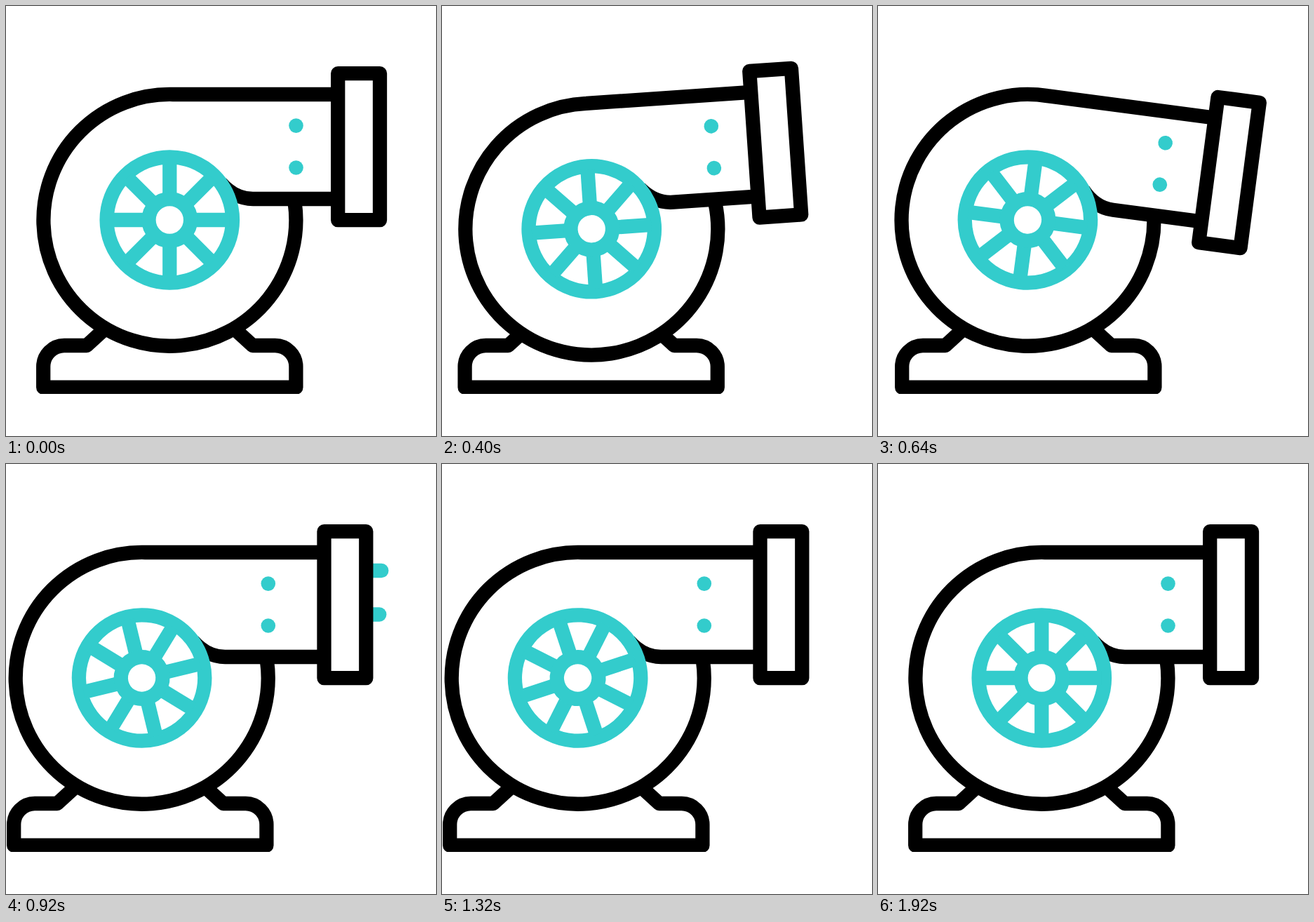
Write an HTML page that moves like this. It is 613 px wide and 613 px high and loops after 2 s.

```html
<!DOCTYPE html>
<html lang="en">
<head>
<meta charset="utf-8">
<title>Turbocharger</title>
<style>
  html, body { margin: 0; width: 100%; height: 100%; overflow: hidden; background: #fff; }
  svg { display: block; width: 100vw; height: 100vh; }
  .ink, .teal { fill: none; stroke-width: 20.3; stroke-linejoin: round; }
  .ink { stroke: #000; }
  .teal { stroke: #3cc; }
  .solid { fill: #fff; }
  .dot { fill: #3cc; }
  #air { stroke-linecap: round; }
</style>
</head>
<body>
<svg viewBox="0 0 613 613">
  <g id="air" class="teal">
    <path d="M390 152H500"/>
    <path d="M380 214.5H497"/>
  </g>
  <path id="base" class="ink" d="M150 452L115 484H83A30 30 0 0 0 53.2 514V543.7H413.4V514A30 30 0 0 0 383.6 484H351.6L316.6 452"/>
  <g id="body">
    <path class="solid" d="M233 126H484V275H233Z"/>
    <path class="ink solid" d="M484 126H238A180 179.4 0 1 0 411.6 280"/>
    <path class="ink" d="M484 275H352C334 275 318 266 306 252"/>
    <path id="flange" class="ink solid" d="M473.2 96.1H533V305.2H473.2Z"/>
    <circle class="dot" cx="413.5" cy="170.6" r="10.3"/>
    <circle class="dot" cx="413.5" cy="230.5" r="10.3"/>
    <g id="wheel" class="teal">
      <circle class="solid" cx="233.3" cy="305" r="89.7"/>
      <g id="spokes"></g>
      <circle class="solid" cx="233.3" cy="305" r="29.8"/>
    </g>
  </g>
  <path class="solid" d="M0 553H613V613H0Z"/>
</svg>
<script>
  const LOOP = 2000, STEP = 40, HUB = '233.3 305';
  const part = id => document.getElementById(id);
  const [air, base, body, flange, wheel, spokes] =
    ['air', 'base', 'body', 'flange', 'wheel', 'spokes'].map(part);

  spokes.innerHTML = [0, 45, 90, 135].map(a =>
    `<path d="M148 305H318.6" transform="rotate(${a} ${HUB})"/>`).join('');

  // Each track is a list of [time in ms, value], eased between neighbours.
  const tracks = {
    baseX: [[80, 0], [320, -34], [520, 4], [760, -42], [1640, -42], [1920, 0]],
    bodyX: [[80, 0], [320, -31], [520, 0], [760, -39.7], [1640, -39.7], [1920, 0]],
    bodyY: [[80, 0], [320, 19.7], [520, 0]],
    tilt: [[80, 0], [320, -14.2], [520, 15], [760, 0]],
    slide: [[560, 0], [780, 20], [1640, 20], [1920, 0]],
    spin: [[760, 0], [1640, 360]],
    airX: [[760, 0], [1640, 405]]
  };

  const ease = u => u * u * (3 - 2 * u);

  function at(name, t) {
    const keys = tracks[name];
    const next = keys.findIndex(k => k[0] > t);
    if (next === 0) return keys[0][1];
    if (next < 0) return keys[keys.length - 1][1];
    const [t0, a] = keys[next - 1], [t1, b] = keys[next];
    return a + (b - a) * ease((t - t0) / (t1 - t0));
  }

  function draw(t) {
    const v = name => at(name, t);
    const move = (el, x) => el.setAttribute('transform', `translate(${x} 0)`);
    move(base, v('baseX'));
    move(flange, v('slide'));
    move(air, v('airX'));
    air.setAttribute('visibility', t > 760 && t < 1320 ? 'visible' : 'hidden');
    body.setAttribute('transform',
      `translate(${v('bodyX')} ${v('bodyY')}) rotate(${v('tilt')} ${HUB})`);
    wheel.setAttribute('transform', `rotate(${v('spin')} ${HUB})`);
  }

  const start = performance.now();
  function tick() {
    // The motion runs at 25 steps a second; the small lead absorbs timer jitter.
    const t = (performance.now() - start + 4) % LOOP;
    draw(Math.floor(t / STEP) * STEP);
    requestAnimationFrame(tick);
  }
  tick();
</script>
</body>
</html>
```
